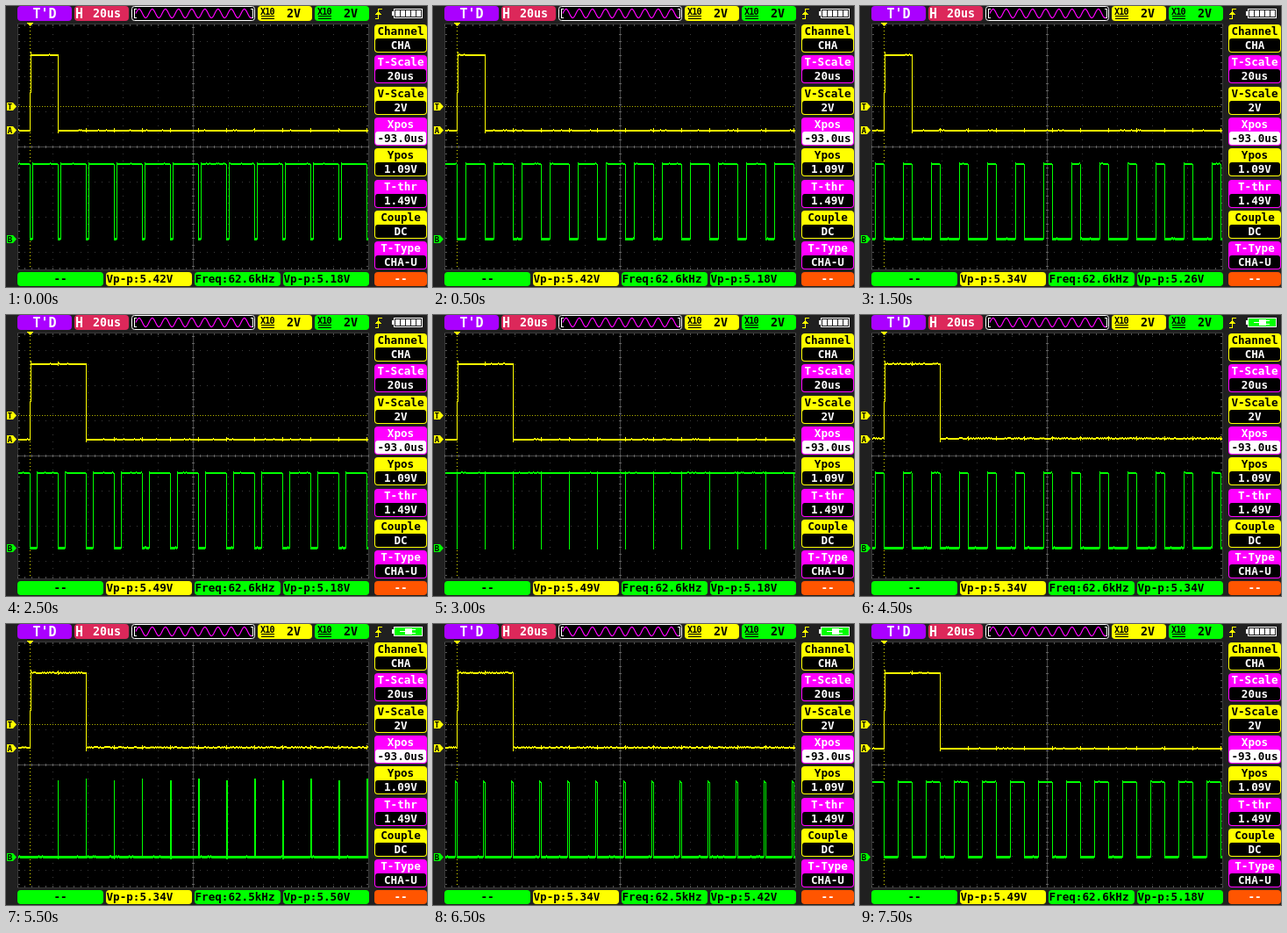
An HTML page for the animation above (8 s loop, 480 px wide and 320 px high).

```html
<!DOCTYPE html>
<html lang="en">
<head>
<meta charset="utf-8">
<title>Oscilloscope</title>
<style>
  html, body { margin: 0; width: 100%; height: 100%; overflow: hidden; background: #202020; }
  svg { display: block; width: 480px; height: 320px; shape-rendering: crispEdges; }
  text { font: bold 12.6px "DejaVu Sans Mono", monospace; white-space: pre; }
  .box { shape-rendering: auto; }
</style>
</head>
<body>
<svg id="scope" viewBox="0 0 480 320"></svg>
<script>
const YELLOW = '#ffff00', GREEN = '#00ff00', PINK = '#ff00ff', ORANGE = '#ff5500';
const STEP = 500, LOOP = 8000, PERIOD = 32, TRIGGER = 27, LEFT = 14, RIGHT = 413;

// High time in px, pulse length in px, A volts, B volts
const STEPS = [
  [29, 32, 5.42, 5.18],
  [22, 32, 5.42, 5.18],
  [16, 32, 5.34, 5.18],
  [10, 32, 5.34, 5.26],
  [17, 64, 5.42, 5.18],
  [24, 64, 5.49, 5.18],
  [32, 64, 5.49, 5.18],
  [24, 64, 5.49, 5.18],
  [17, 64, 5.42, 5.26],
  [10, 64, 5.34, 5.34],
  [5, 64, 5.34, 5.42],
  [0, 64, 5.34, 5.50],
  [0, 64, 5.34, 5.50],
  [2, 64, 5.34, 5.42],
  [9, 64, 5.34, 5.34],
  [16, 64, 5.49, 5.18]
];

const rect = (x, y, w, h, fill, more = '') =>
  `<rect x="${x}" y="${y}" width="${w}" height="${h}" fill="${fill}" ${more}/>`;
const box = (x, y, w, h, fill, r = 4) => rect(x, y, w, h, fill, `rx="${r}" class="box"`);
const label = (x, y, s, fill = '#000', more = '') =>
  `<text x="${x}" y="${y}" fill="${fill}" ${more}>${s}</text>`;
const line = (d, color, width = 1, dash = '') =>
  `<path d="${d}" fill="none" stroke="${color}" stroke-width="${width}" stroke-dasharray="${dash}"/>`;
const middle = 'text-anchor="middle"';

function grid() {
  let s = rect(13, 20, 401, 281, '#000');
  for (let y = 40; y <= 280; y += 40) s += line(`M13 ${y}.5H414`, '#3a3a3a', 1, '1 7');
  for (let x = 53; x <= 373; x += 40) s += line(`M${x}.5 24V300`, '#3a3a3a', 1, '1 7');
  s += line('M13.5 20.5H413.5V300.5H13.5Z', '#383838');
  s += line('M213.5 20V300M13 160.5H414', '#444');
  s += line('M213.5 24V300M13 160.5H414', '#666', 3, '1 7');
  s += line('M13 22H414M13 299H414', '#555', 2, '1 7');
  s += line('M15 24V300M412 24V300', '#555', 2, '1 7');
  s += line('M14 114.5H413', '#b4b400', 1, '1 2');
  s += line('M27.5 20V300', '#e0e000', 1, '1 3');
  return s + `<path d="M24 19h7l-3.5 4z" fill="${YELLOW}"/>`;
}

function marker(y, letter, color) {
  return `<path class="box" d="M1 ${y - 4}h7l4 4.5l-4 4.5h-7z" fill="${color}"/>` +
    label(1.8, y + 3.8, letter, '#000', 'style="font-size:9px"');
}

function probe(x, color) {
  return box(x, 0, 62, 17, color) +
    label(x + 3, 10, 'X10', '#000', 'style="font-size:10px;letter-spacing:-.8px"') +
    line(`M${x + 4} 11.5h15M${x + 4} 14.5h15`, '#000') +
    label(x + 33, 13, '2V', '#000', 'style="font-size:13.3px"');
}

function topBar() {
  let wave = '';
  for (let x = 148; x <= 280; x++) {
    wave += (wave ? 'L' : 'M') + x + ' ' + (8.5 - 5 * Math.sin((x - 148) / 15 * 2 * Math.PI)).toFixed(1);
  }
  return box(13, 0, 62, 17, '#aa00ff') + label(44, 14, "T'D", '#fff', middle + ' style="font-size:15px"') +
    box(78, 0, 62, 17, '#dc285a') + label(79, 14, 'H', '#fff', 'style="font-size:15px"') +
    label(99, 13, '20us', '#fff', 'style="font-size:13.3px"') +
    rect(143.5, .5, 140, 16, '#000', 'rx="3" stroke="#fff" class="box"') +
    line('M149 3.5H146.5V13.5H149M279 3.5H281.5V13.5H279', '#fff') +
    `<g class="box">${line(wave, PINK, 1.2)}</g>` +
    probe(287, YELLOW) + probe(352, GREEN) +
    line('M421 14.5H424.5V3.5H429', YELLOW) +
    `<path d="M421 10l3.5-4l3.5 4z" fill="${YELLOW}"/>`;
}

function battery() {
  let cells = '';
  for (let i = 0; i < 5; i++) cells += rect(444 + i * 6, 5, 5, 7, '#fff');
  const shell = line('M442.5 3.5H474.5V13.5H442.5Z', '#fff') + rect(440, 6, 2, 5, '#fff');
  const plug = rect(443, 4, 31, 9, GREEN) + rect(455, 5, 8, 7, '#fff') +
    rect(449, 8, 6, 1, '#fff') + rect(463, 6, 4, 1, '#fff') + rect(463, 10, 4, 1, '#fff');
  return shell + `<g id="cells">${cells}</g><g id="plug">${plug}</g>`;
}

function sideMenu() {
  const items = [['Channel', 'CHA'], ['T-Scale', '20us'], ['V-Scale', '2V'], ['Xpos', '-93.0us'],
    ['Ypos', '1.09V'], ['T-thr', '1.49V'], ['Couple', 'DC'], ['T-Type', 'CHA-U']];
  return items.map(([name, value], i) => {
    const y = 21 + Math.round(i * 35.3), odd = i % 2, active = name === 'Xpos';
    return box(420, y, 60, 32, odd ? PINK : YELLOW) +
      box(421, y + 16, 58, 15, active ? '#fff' : '#000', 3) +
      label(450, y + 12, name, odd ? '#fff' : '#000', middle) +
      label(450, y + 28, value, active ? '#000' : '#fff', middle);
  }).join('');
}

function bottomBar() {
  return box(13, 303, 98, 16, GREEN) + label(62, 315, '--', '#000', middle) +
    box(114, 303, 98, 16, YELLOW) + label(114.5, 315, '', '#000', 'id="voltsA"') +
    box(215, 303, 98, 16, GREEN) + label(215.5, 315, '', '#000', 'id="freq"') +
    box(316, 303, 98, 16, GREEN) + label(316.5, 315, '', '#000', 'id="voltsB"') +
    box(420, 303, 60, 16, ORANGE) + label(450, 315, '--', '#fff', middle);
}

const $ = id => document.getElementById(id);
$('scope').innerHTML = grid() + `<path id="traceB" fill="${GREEN}"/><path id="traceA" fill="${YELLOW}"/>` +
  marker(114, 'T', YELLOW) + marker(141, 'A', YELLOW) + marker(265, 'B', GREEN) +
  topBar() + battery() + sideMenu() + bottomBar();

function random(seed) {
  return () => (seed = seed * 16807 % 2147483647) / 2147483647;
}

const bar = (x, y, w, h) => `M${x} ${y}h${w}v${h}h${-w}z`;

function traceA(length, charging, rnd) {
  const end = TRIGGER + length;
  let d = bar(TRIGGER, 98, 1, 44) + bar(TRIGGER + 1, 52, 1, 47) + bar(end, 55, 1, 90);
  for (let x = LEFT; x < RIGHT; x++) {
    const high = x > TRIGGER && x < end;
    const y = high ? 55 : charging ? 140 : 141;
    const jitter = rnd() < (charging ? .35 : .05) ? -1 : 0;
    d += bar(x, y + jitter, 1, 2);
    if (x > TRIGGER && (x - TRIGGER) % PERIOD === 0) d += bar(x, y - 2, 1, 5);
  }
  return d;
}

function traceB(high, rnd) {
  let d = '';
  for (let x = LEFT; x < RIGHT; x++) {
    const phase = (x - TRIGGER + PERIOD) % PERIOD;
    const up = phase >= PERIOD - high;
    d += bar(x, (up ? 179 : 264) - (rnd() < .06 ? 1 : 0), 1, up ? 2 : 3);
  }
  for (let k = 0; k < 13; k++) {
    const fall = TRIGGER + k * PERIOD, rise = fall - high;
    if (high) {
      if (rise >= LEFT) d += bar(rise, 178, 1, 88);
      d += bar(fall, 180, 1, 87);
    } else if (k) {
      d += bar(fall, 176 + k % 2 * 2, k < 5 ? 1 : 2, 90);
    }
  }
  return d;
}

let shown = -1;
function draw() {
  let i = Math.floor(performance.now() % LOOP / STEP);
  if (i === 12) i = 11;
  if (i !== shown) {
    shown = i;
    const [high, length, a, b] = STEPS[i];
    const charging = i >= 9 && i < 15, rnd = random(1234 + i * 7919);
    $('traceA').setAttribute('d', traceA(length, charging, rnd));
    $('traceB').setAttribute('d', traceB(high, rnd));
    $('voltsA').textContent = `Vp-p:${a.toFixed(2)}V`;
    $('voltsB').textContent = `Vp-p:${b.toFixed(2)}V`;
    $('freq').textContent = `Freq:${i >= 11 && i < 15 ? '62.5' : '62.6'}kHz`;
    $('cells').style.display = charging ? 'none' : '';
    $('plug').style.display = charging ? '' : 'none';
  }
  requestAnimationFrame(draw);
}
draw();
</script>
</body>
</html>
```
